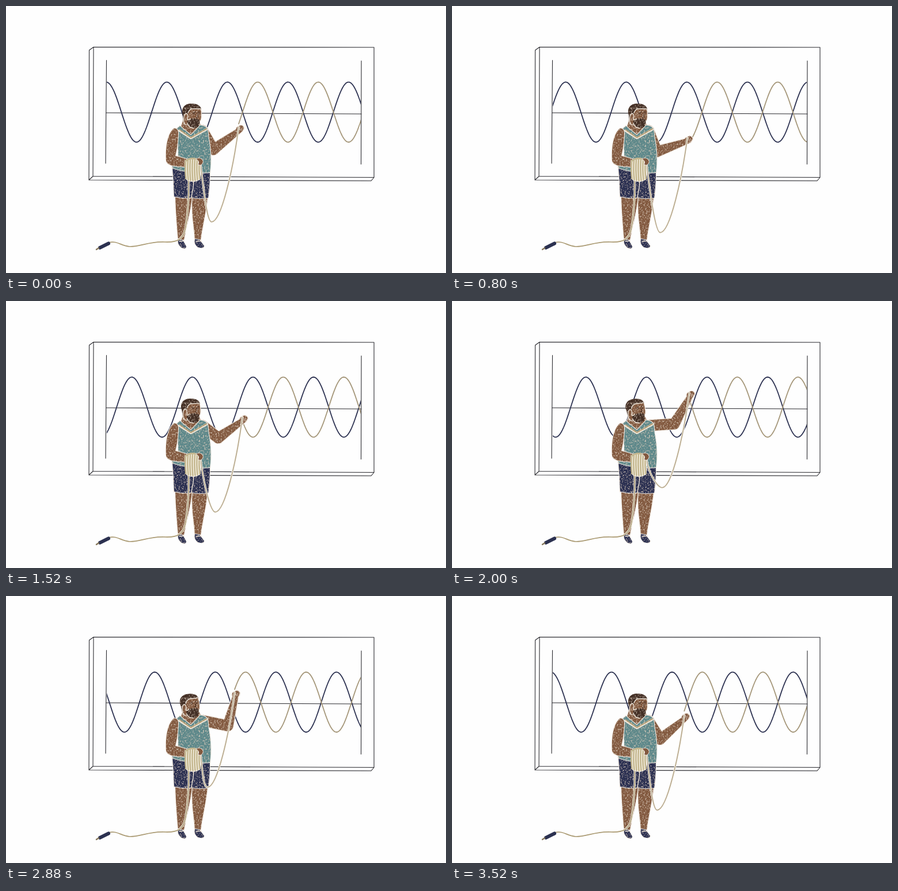
An HTML page that plays this animation: 764 px wide and 465 px high, repeating every 3600 ms.

```html
<!DOCTYPE html>
<html lang="en">
<head>
<meta charset="utf-8">
<title>Rope waves</title>
<style>
  html, body { margin: 0; width: 100%; height: 100%; overflow: hidden; background: #fefefe; }
  svg { display: block; width: 764px; height: 465px; }
  path { stroke-linecap: round; stroke-linejoin: round; }
  .line { fill: none; stroke: #2b2b30; stroke-width: 1.1; }
  .wave { fill: none; stroke-width: 1.8; }
  .navy { stroke: #2e3352; }
  .tan { stroke: #a5977a; }
  .part { stroke: #f4efe8; stroke-width: 2.2; paint-order: stroke; }
  .skin { fill: #82593f; }
  .hair { fill: #432f25; }
  .shirt { fill: #5d888a; }
  .cloth { fill: #292e50; }
  .edge { fill: none; stroke: #f1e9dd; stroke-width: 1.4; }
  .dark { fill: none; stroke: #39271f; stroke-width: 1; }
  .halo { fill: none; stroke: #fbf8f2; stroke-width: 3.4; }
  .rope { fill: none; stroke: #b6a88c; stroke-width: 1.7; }
  .coil { fill: none; stroke: #c4b78f; stroke-width: 2.6; }
</style>
</head>
<body>
<svg viewBox="0 0 764 465">
  <defs>
    <clipPath id="plot"><path d="M175 120H616V250H175Z"/></clipPath>
    <filter id="crayon" filterUnits="userSpaceOnUse" x="270" y="120" width="160" height="310" color-interpolation-filters="sRGB">
      <feTurbulence type="fractalNoise" baseFrequency=".45 .35" numOctaves="2" seed="4"/>
      <feColorMatrix values="0 0 0 0 .86  0 0 0 0 .8  0 0 0 0 .74  3 0 0 0 -1.5"/>
      <feComposite in2="SourceGraphic" operator="in" result="grain"/>
      <feMerge><feMergeNode in="SourceGraphic"/><feMergeNode in="grain"/></feMerge>
    </filter>
  </defs>

  <path class="line" d="M152 71.5L639 72V298.5L151 296.5L152 71.5L144.500 77L144 303L634 304.500L639 298.500M144 303L151 296.500"/>
  <path class="line" d="M174.500 94.500L173 274M617 95.500L616.500 275.500" stroke-width="1.4"/>
  <path class="line" d="M174 186L617 188"/>
  <g clip-path="url(#plot)">
    <path id="navyWave" class="wave navy"/>
    <path id="tanWave" class="wave tan"/>
  </g>

  <g filter="url(#crayon)">
    <path id="arm" class="part skin"/>
    <path id="fingers" class="edge" style="stroke-width:.8"/>

    <path class="part skin" d="M294 331C295 360 297 385 299 407L309 407C312 385 320 362 323 331ZM324 331C321 360 327 385 328 407L338 407C340 388 347 362 350 331Z"/>
    <path class="part cloth" d="M299 406L307 408L313 419Q312 424 305 421Q297 415 299 406ZM328 406L336 407L344 418Q343 423 333 420Q326 414 328 406Z"/>
    <path class="edge" d="M301 410L309 409M330 410L339 409"/>
    <path class="part cloth" d="M289 280L354 287Q354 312 351 334Q337 336 324 334L322 331L320 334Q306 335 292 332Q291 305 289 280Z"/>
    <path class="edge" d="M326 306Q325 320 322 331"/>
    <path class="part skin" d="M308 198L334 200L340 211L322 226L303 213Z"/>
    <path class="part shirt" d="M302 209L321 225L337 208Q344 207 350 214Q351 228 354 244Q357 268 354 290Q320 292 289 282L288 276L299 262Q300 238 296 214Z"/>
    <path class="edge" d="M301 217L321 230L348 215" style="stroke-width:4"/>
    <path d="M302 216L321 229L348 214" fill="none" stroke="#ad9566" stroke-width="2"/>
    <path class="part skin" d="M292 213C280 222 277 248 278 268C279 279 294 279 312 280L316 267Q304 264 294 261Q299 240 299 220Q298 213 292 213Z"/>

    <g id="head">
      <path class="part skin" d="M309 186L320 177L338 179Q340 190 338 198L332 208L311 206Z"/>
      <path class="hair" d="M307 190C303 176 312 169 323 170C333 170 339 175 339 180Q328 177 320 181Q318 184 316 187L315 200L308 203Z"/>
      <path class="hair" d="M314 199Q317 199 319 197Q327 194 336 198Q338 209 331 212Q320 214 315 207Z"/>
      <path class="skin" d="M309 200Q309 187 313 187Q317 189 315 202Q311 206 309 200Z"/>
      <path class="edge" d="M309 205Q307 189 313 187Q317 188 315 198Q318 199 320 196M316 186Q319 179 324 179L338 179M315 204Q317 212 326 213"/>
      <path class="dark" d="M324 186L329 185M333 185L337 185M325 188H328M334 188H336M332 187L333 194H330"/>
    </g>
  </g>

  <path class="halo" d="M317 302C318 340 315 360 312 385C308 406 299 411 276 411"/>
  <path class="rope" d="M317 302C318 340 315 360 312 385C308 406 299 412 276 411C246 410 236 419 215 419C199 418 194 408 178 412" style="stroke:#ab9b74"/>
  <path d="M178 413.500L163 421" stroke="#2c3150" stroke-width="6"/>
  <path d="M161 421.500L157 424" stroke="#85765a" stroke-width="2.500"/>
  <path id="ropeHalo" class="halo"/>
  <path id="rope" class="rope"/>
  <path id="coilHalo" class="part" fill="#f7f2e6" d="M311 270Q322 262 337 269L337 301Q324 309 313 301Z"/>
  <path id="coil" class="coil"/>
  <path class="part skin" d="M330 266Q340 263 342 271Q340 279 334 276Q337 270 330 266Z" style="stroke-width:1.5"/>
</svg>
<script>
const LOOP = 3600, STEP = 80, PERIOD = 105.2, MID = 184.8, AMP = 52.3;
const $ = id => document.getElementById(id);
const draw = (id, d) => $(id).setAttribute('d', d);

// time, grip x, grip y, elbow x, elbow y, head angle
const POSES = [
  [0, 404, 211, 360, 250, 0],
  [480, 409, 229, 357, 252, 0],
  [1120, 408, 223, 357, 252, -1],
  [1760, 412, 186, 377, 228, -6],
  [2000, 412, 160, 386, 214, -9],
  [2480, 399, 131, 379, 197, -10],
  [2880, 397, 168, 385, 226, -8],
  [3360, 402, 200, 365, 247, -1]
];

function keyAt(i) {
  const n = POSES.length, turn = Math.floor(i / n);
  const [t, ...values] = POSES[i - turn * n];
  return [t + turn * LOOP, ...values];
}

// Smooth periodic interpolation between the poses
function poseAt(t) {
  let i = POSES.length - 1;
  while (POSES[i][0] > t) i--;
  const [p, a, b, q] = [-1, 0, 1, 2].map(k => keyAt(i + k));
  const span = b[0] - a[0], u = (t - a[0]) / span;
  return a.map((from, k) => {
    const m0 = (b[k] - p[k]) / (b[0] - p[0]) * span;
    const m1 = (q[k] - from) / (q[0] - a[0]) * span;
    const d = b[k] - from;
    return from + u * (m0 + u * (3 * d - 2 * m0 - m1 + u * (m0 + m1 - 2 * d)));
  }).slice(1);
}

function wave(peak, start) {
  let d = '';
  for (let x = start; x <= 618; x += 2) {
    const y = MID - AMP * Math.cos((x - peak) * 2 * Math.PI / PERIOD);
    d += `${d ? 'L' : 'M'}${x.toFixed(1)} ${y.toFixed(1)}`;
  }
  return d;
}

// Tapered limb with round ends
function limb(ax, ay, ra, bx, by, rb) {
  const angle = Math.atan2(by - ay, bx - ax), nx = -Math.sin(angle), ny = Math.cos(angle);
  return `M${ax + nx * ra} ${ay + ny * ra}A${ra} ${ra} 0 0 1 ${ax - nx * ra} ${ay - ny * ra}` +
    `L${bx - nx * rb} ${by - ny * rb}A${rb} ${rb} 0 0 1 ${bx + nx * rb} ${by + ny * rb}Z`;
}

function render(t) {
  const peak = 174 + PERIOD * t / LOOP;
  const [gx, gy, ex, ey, tilt] = poseAt(t);
  draw('navyWave', wave(peak, 174));
  draw('tanWave', wave(peak + PERIOD / 2, gx));

  const hx = gx + 2, hy = gy + 5;
  draw('arm', limb(341, 217, 9.5, ex, ey, 9.5) + limb(ex, ey, 9.5, hx, hy, 4.5) +
    limb(hx - 1, hy - 1, 5.5, hx + 2, hy - 3, 5));
  draw('fingers', [0, 3, 6].map(k => `M${hx + k} ${hy - 5 + k / 2}l-1 5`).join(''));
  $('head').setAttribute('transform', `rotate(${tilt} 323 214)`);

  const bx = gx - 47, by = gy + 165, drop = by - 276;
  const rope = `M338 276C${338 + drop * .06} ${276 + drop * .5} ${bx - 8} ${by} ${bx} ${by}` +
    `C${bx + 17} ${by} ${gx - 9} ${gy + 70} ${gx} ${gy}`;
  draw('rope', rope);
  draw('ropeHalo', rope);
}

draw('coil', Array.from({ length: 7 }, (_, i) => {
  const x = 312 + i * 4, sag = 5 * Math.sin(Math.PI * (i + 1) / 8);
  return `M${x} ${271 - sag}Q${x - 1.5} 286 ${x + .5} ${299 + sag}`;
}).join('') + 'M312 270Q322 262 334 268');

let shown = -1;
function tick() {
  const t = Math.floor(performance.now() % LOOP / STEP) * STEP;
  if (t !== shown) render(shown = t);
  requestAnimationFrame(tick);
}
tick();
</script>
</body>
</html>
```
